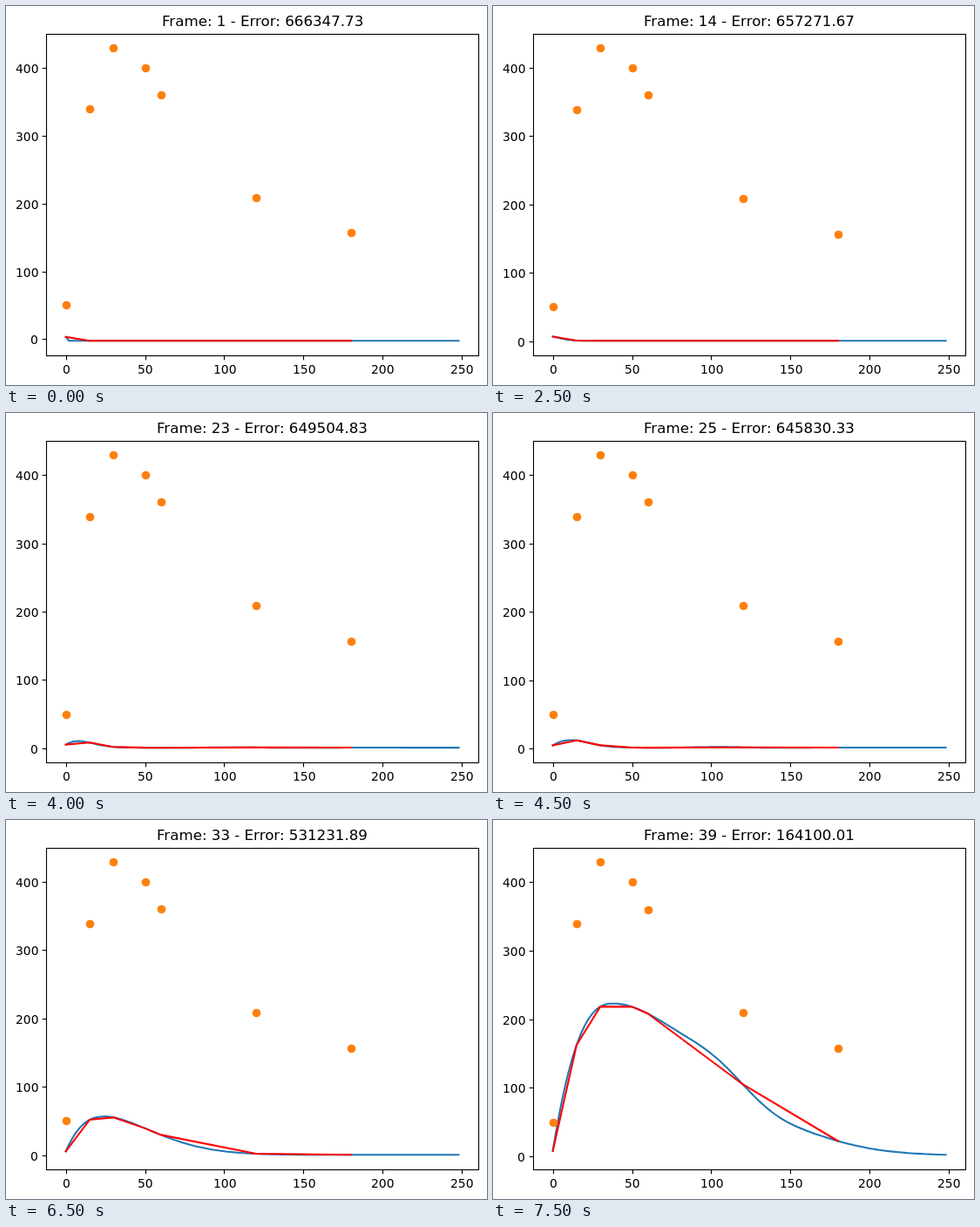
Write an HTML page with a canvas that moves like this. It is 552 px wide and 435 px high and loops after 8000 ms.

```html
<!DOCTYPE html>
<html lang="en">
<head>
<meta charset="utf-8">
<title>Curve fit</title>
<style>
  html, body { margin: 0; width: 100%; height: 100%; overflow: hidden; background: #fff; }
  canvas { display: block; }
</style>
</head>
<body>
<canvas id="plot" width="552" height="435"></canvas>
<script>
const ctx = document.getElementById('plot').getContext('2d');
const LEFT = 46.1, TOP = 31.5, WIDTH = 496, HEIGHT = 369.6, BOTTOM = TOP + HEIGHT;
const STEP_MS = 500, STEPS = 16, X_MAX = 248, THIN = 1.11, THICK = 2.08;

const data = [[0, 50], [15, 339], [30, 429], [50, 400], [60, 360], [120, 209], [180, 157]];

// Each stage is a hump: it rises from start to top at x = mid, then falls to tail
// over a given width and power. Ease shapes the way to the next stage.
const stages = [
  { step: 0, count: 1, error: 666347.73, start: 3.2, mid: 0, top: 3.2, width: 1, power: 2, tail: -2.45, ripple: 0, ease: .1 },
  { step: 3, count: 5, error: 658107.38, start: 5, mid: 0, top: 5, width: 2, power: 1, tail: .45, ripple: 0, ease: 1 },
  { step: 6, count: 18, error: 656853.82, start: 7.3, mid: 0, top: 7.3, width: 10.7, power: 1.7, tail: .4, ripple: 0, ease: 1 },
  { step: 9, count: 25, error: 645830.33, start: 4.5, mid: 13, top: 12.2, width: 15.3, power: 1.7, tail: 1.3, ripple: .8, ease: 2 },
  { step: 11, count: 27, error: 617441.39, start: 7, mid: 20, top: 28.5, width: 19, power: 1.7, tail: 2.8, ripple: .9, ease: 1 },
  { step: 13, count: 33, error: 531231.89, start: 5.5, mid: 25, top: 56.5, width: 45, power: 1.7, tail: .4, ripple: 0, ease: 1 },
  { step: 15, count: 39, error: 164100.01, start: 8, mid: 39, top: 223, width: 91, power: 1.95, tail: .8, ripple: 9, ease: 1 }
];

function stateAt(step) {
  const i = stages.findLastIndex(s => s.step <= step);
  const from = stages[i], to = stages[i + 1];
  if (!to) return from;
  const t = (step - from.step) / (to.step - from.step), share = t ** from.ease;
  const state = {};
  for (const key in from) state[key] = from[key] + (to[key] - from[key]) * share;
  state.count = Math.round(from.count + (to.count - from.count) * t);
  return state;
}

function fit({ start, mid, top, width, power, tail, ripple }, x) {
  const wave = ripple * Math.sin((x - 80) / 15) * Math.exp(-(((x - 110) / 45) ** 2));
  const hump = x < mid
    ? top - (top - start) * (1 - x / mid) ** 2.6
    : tail + (top - tail) * Math.exp(-(((x - mid) / width) ** power));
  return hump + wave;
}

const snap = v => Math.round(v) + .5;

function polyline(points, color, width) {
  ctx.beginPath();
  points.forEach(([x, y]) => ctx.lineTo(x, y));
  ctx.strokeStyle = color;
  ctx.lineWidth = width;
  ctx.stroke();
}

// Anchor is the share of the inked width that lies left of x
function label(text, x, y, size, anchor) {
  ctx.font = `${size}px "DejaVu Sans", sans-serif`;
  ctx.fillStyle = '#000';
  ctx.fillText(text, Math.round(x - ctx.measureText(text).actualBoundingBoxRight * anchor), y);
}

function draw(state) {
  const blue = Array.from({ length: X_MAX / 2 + 1 }, (_, i) => [2 * i, fit(state, 2 * i)]);
  const red = data.map(([x]) => [x, fit(state, x)]);

  // Axes keep a 5% margin around the data
  const low = Math.min(...blue.map(p => p[1])), high = Math.max(...data.map(p => p[1]));
  const px = x => LEFT + WIDTH * (x / X_MAX + .05) / 1.1;
  const py = y => BOTTOM - HEIGHT * ((y - low) / (high - low) + .05) / 1.1;
  const place = ([x, y]) => [px(x), py(y)];

  ctx.fillStyle = '#fff';
  ctx.fillRect(0, 0, 552, 435);
  ctx.lineJoin = 'round';
  ctx.lineCap = 'square';
  polyline(blue.map(place), '#1f77b4', THICK);
  ctx.fillStyle = '#ff7f0e';
  for (const point of data) {
    const [x, y] = place(point).map(snap);
    ctx.beginPath();
    ctx.arc(x, y, 4.86, 0, 7);
    ctx.fill();
  }
  polyline(red.map(place), '#f00', THICK);

  ctx.lineCap = 'butt';
  ctx.lineJoin = 'miter';
  const left = snap(LEFT), bottom = snap(BOTTOM);
  for (let x = 0; x <= 250; x += 50) {
    const tick = snap(px(x));
    polyline([[tick, bottom], [tick, bottom + 4.86]], '#000', THIN);
    label(x, px(x), 422, 13.89, .5);
  }
  for (let y = 0; y <= 400; y += 100) {
    const tick = snap(py(y));
    polyline([[left - 4.86, tick], [left, tick]], '#000', THIN);
    label(y, LEFT - 9.72, Math.round(py(y) + 6), 13.89, 1);
  }
  ctx.strokeRect(left, snap(TOP), WIDTH, bottom - snap(TOP));
  label(`Frame: ${state.count} - Error: ${state.error.toFixed(2)}`, LEFT + WIDTH / 2, 23, 16.67, .5);
}

function tick(now) {
  draw(stateAt(Math.floor(now / STEP_MS) % STEPS));
  requestAnimationFrame(tick);
}
requestAnimationFrame(tick);
</script>
</body>
</html>
```
